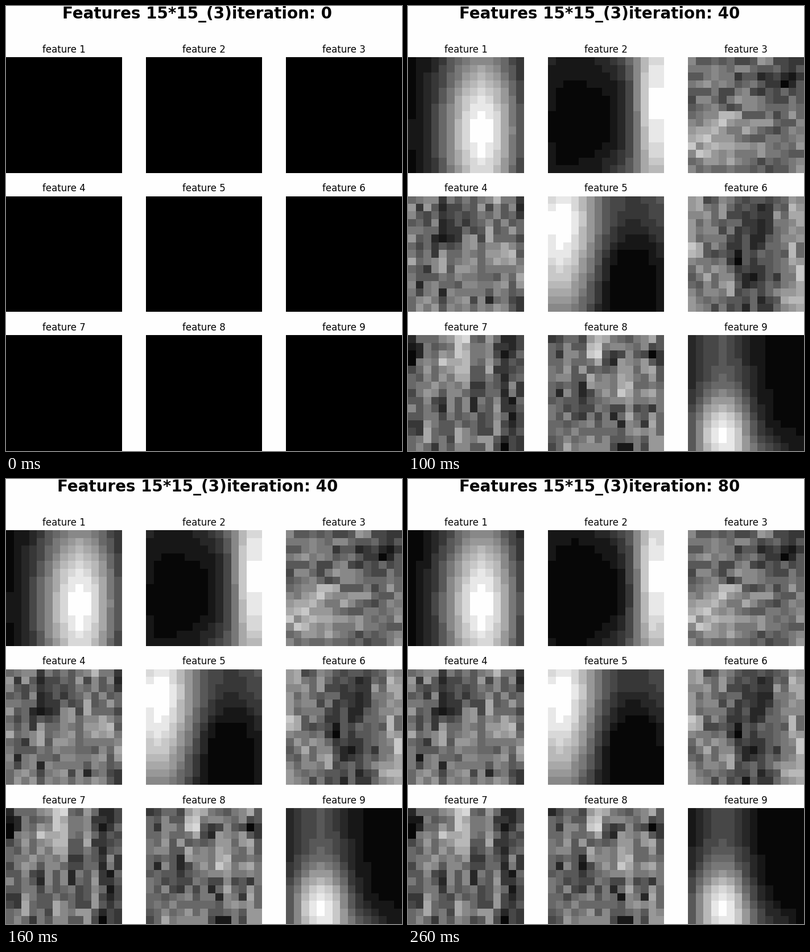
Animation, 696 px wide and 783 px high, one loop 300 ms. Source, as a matplotlib script:

```python
import matplotlib.pyplot as plt
import numpy as np
from matplotlib.animation import FuncAnimation

W, H, DPI, N = 696, 783, 100, 15
PAPER, INK = "#fefefe", "#070707"

y, x = np.mgrid[0:N, 0:N].astype(float)


def bell(u, center, left, right=None):
    """One-dimensional bump with its own width on each side."""
    d = u - center
    s = np.where(d < 0, left, right or left)
    return np.exp(-0.5 * (d / s) ** 2)


def blob(cx, cy, sx, sy):
    return bell(x, cx, sx) * bell(y, cy, sy)


def grain(seed, axis, amount=1.9):
    """Seeded noise, streaked along one axis."""
    noise = np.random.default_rng(seed).normal(size=(N, N))
    return 6.5 + amount * (noise + 0.6 * np.roll(noise, 1, axis)) / 1.17


# Smooth features: broad bumps on a dark ground, in gray levels 0 to 15.

def glow():
    return 15.7 * bell(x, 9.1, 3.75, 3.3) * bell(y, 9.2, 8.5) - 0.3


def right_band():
    edge = 15.2 * blob(13.5, 5.8, 2.1, 10.5)
    rim = 2.2 * ((y - 7) / 7) ** 2 * bell(x, 8.8, 2.3)
    ground = 0.02 * (y - 8.3) ** 2 * (1 - x / N)
    return edge + rim + ground + 0.4 * (x < 1)


def left_glow():
    peak = 15.3 * bell(x, 1, 3.6) * bell(y, 3, 6.5, 10)
    haze = 4 * bell(y, 0, 4) * x / (N - 1)
    return peak + haze - 2 * blob(9, 11, 2.5, 4.5) + blob(14.5, 10, 1.2, 9)


def flame():
    height = 4.5 + 10.4 * bell(y, 12.4, 3.5)
    return height * bell(x, 4, 2.8, 2.6) + 3 * blob(9.5, 15, 3, 2)


# Rough features: streaky noise with a few soft light and dark patches.

def slope():
    return grain(3, 1, 1.5) + 5 * blob(2.5, 10, 2, 1.8) - 4 * blob(12, 2, 2.2, 1.8)


def patches():
    return grain(4, 0, 1.7) + 4 * blob(12, 7, 1.2, 1) - 4 * blob(4.5, 3.5, 1.8, 2)


def dark_band():
    return (grain(6, 0, 1.5) - 3.5 * bell(x, 7.8, 1.6) + 3 * bell(x, 13.5, 0.8)
            + 6 * blob(0, 6.7, 0.9, 1))


def streaks():
    waves = 1.5 * np.cos(2 * np.pi * (x - 2.2) / 4)
    return (grain(7, 0) + waves + 5 * blob(5.5, 1, 2, 3)
            - 4 * bell(x, 14, 1.5) - 5 * blob(0, 1, 1, 1))


def smudge():
    return (grain(8, 0) + 5 * blob(9.5, 7, 1.8, 1) + 6 * blob(5.8, 0.8, 0.9, 1.3)
            - 3 * blob(3.5, 9, 2, 1.8) - 5 * blob(14, 2, 0.8, 1))


smooth = (glow, right_band, left_glow, flame)
features = (glow, right_band, slope, patches, left_glow,
            dark_band, streaks, smudge, flame)


def to_gray(levels):
    """Round to sixteen evenly spaced grays."""
    k = np.clip(np.rint(levels), 0, 15)
    return np.where(k == 15, 254, np.rint(7 + 16.1 * k))


def picture(feature, step):
    if step == 0:
        return np.zeros((N, N))
    levels = feature()
    if step == 2 and feature in smooth:
        levels = 1.03 * levels - 0.45
    elif step == 2:
        levels = 1.01 * levels - 0.1
    return to_gray(levels)


plt.rcParams["font.family"] = "DejaVu Sans"
fig, axes = plt.subplots(3, 3, figsize=(W / DPI, H / DPI), dpi=DPI,
                         facecolor=PAPER)
fig.subplots_adjust(left=0, right=1, bottom=0, top=0.885,
                    wspace=0.2, hspace=0.2)

images, labels = [], []
for i, ax in enumerate(axes.flat):
    images.append(ax.imshow(np.zeros((N, N)), cmap="gray", vmin=0, vmax=255,
                            interpolation="nearest"))
    labels.append(ax.set_title(f"feature {i + 1}", fontsize=12))
    ax.axis("off")
head = fig.text(336.4 / W, 1 - 22 / H, "", fontsize=20, fontweight="bold",
                ha="center", va="baseline")


def draw(step):
    head.set_text(f"Features 15*15_(3)iteration: {40 * step}")
    for im, feature in zip(images, features):
        im.set_data(picture(feature, step))
    for text in [head, *labels]:
        text.set_color(INK if step else "black")
    return [head, *labels, *images]


anim = FuncAnimation(fig, draw, frames=3, interval=100, repeat=True,
                     repeat_delay=0, blit=False)
plt.show()
```
